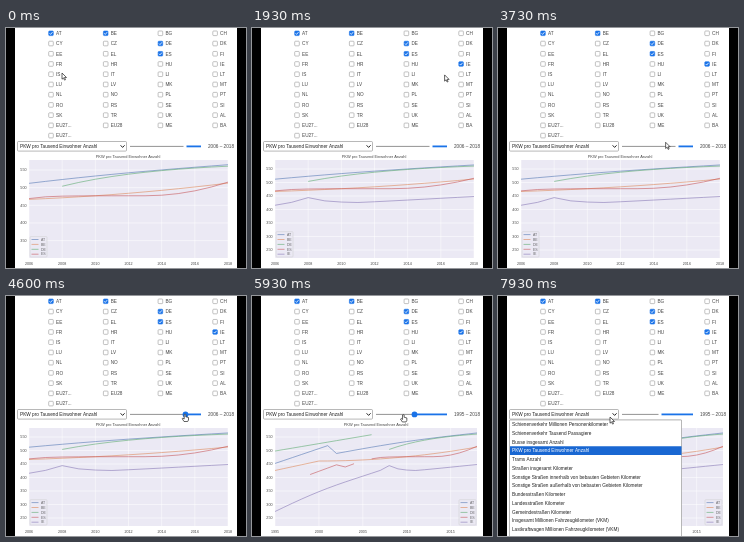
Recreate the animation shown at these times as an HTML page with a canvas. Size 240x240 px, loop 8 s.

```html
<!DOCTYPE html>
<html lang="de">
<head>
<meta charset="utf-8">
<style>
html, body { margin: 0; width: 100%; height: 100%; overflow: hidden; background: #000; }
canvas { display: block; width: 100vw; height: 100vh; }
</style>
</head>
<body>
<canvas></canvas>
<script>
const canvas = document.querySelector('canvas');
const ctx = canvas.getContext('2d');
const LOOP = 8000, BLUE = '#1a73e8', INK = '#444';
const CHECK_IE = 1600, ADD_IE = 1750, DRAG_START = 4750, DRAG_END = 5550, WIDEN = 5650, OPEN = 7110;
const TITLE = 'PKW pro Tausend Einwohner Anzahl';

const COUNTRIES = ['AT BE BG CH', 'CY CZ DE DK', 'EE EL ES FI', 'FR HR HU IE', 'IS IT LI LT', 'LU LV MK MT',
  'NL NO PL PT', 'RO RS SE SI', 'SK TR UK AL', 'EU27... EU28 ME BA', 'EU27...'].map(row => row.split(' '));

const OPTIONS = ['Schienenverkehr Millionen Personenkilometer', 'Schienenverkehr Tausend Passagiere',
  'Busse insgesamt Anzahl', TITLE, 'Trams Anzahl', 'Straßen insgesamt Kilometer',
  'Sonstige Straßen innerhalb von bebauten Gebieten Kilometer',
  'Sonstige Straßen außerhalb von bebauten Gebieten Kilometer', 'Bundesstraßen Kilometer',
  'Landesstraßen Kilometer', 'Gemeindestraßen Kilometer', 'Insgesamt Millionen Fahrzeugkilometer (VKM)',
  'Lastkraftwagen Millionen Fahrzeugkilometer (VKM)'];

const since = (year, start) => Math.max(0, year - start);
const decay = (year, start) => Math.exp(start - year);

// Cars per thousand people by year; NaN leaves a gap in the line.
const SERIES = [
  { name: 'AT', color: '#4c72b0', value: y => y < 2002
    ? 452 + 11 * (y - 1995)
    : 489 + 4.75 * (y - 2002) + 6 * Math.sin(Math.PI * (y - 2002) / 16) },
  { name: 'BE', color: '#dd8452', value: y =>
    426 + 7 * Math.min(y - 1995, 5) + 0.16 * since(y, 2000) ** 2 },
  { name: 'DE', color: '#55a868', value: y => y <= 2006 ? 498 + 5.5 * (y - 1995)
    : y < 2008 ? NaN : 504 + 70 * (1 - Math.exp((2008 - y) / 6)) },
  { name: 'ES', color: '#c44e52', value: y => y < 1999 || y === 2005 ? NaN
    : y < 2005 ? 411 + 12 * (y - 1999) - (y > 2002 ? 20 : 0)
    : 477 - 8 * decay(y, 2006) + 1.55 * since(y, 2013) ** 2 },
  { name: 'IE', color: '#8172b3', value: y => y < 2008
    ? 274 + 13.1 * (y - 1995) + 8 * Math.sin(Math.PI * (y - 1995) / 10)
    : 425 + 19 * decay(y, 2008) + 3.3 * since(y, 2011) }
];

// Pointer stops: arrival time, x, y.
const POINTER = [[0, 56, 45], [1130, 215, 28], [CHECK_IE, 209, 35], [2800, 121, 99], [4100, 179, 118],
  [DRAG_START, 179, 118], [DRAG_END, 162, 118], [6800, 114, 120], [LOOP, 112, 121]];

const clamp = x => Math.min(1, Math.max(0, x));
const ease = x => x * x * (3 - 2 * x);

function pointerAt(t) {
  const i = POINTER.findIndex(p => p[0] > t);
  const [start, x, y] = POINTER[i - 1], [end, nextX, nextY] = POINTER[i];
  const k = ease((t - start) / (end - start));
  return [x + (nextX - x) * k, y + (nextY - y) * k];
}

function rect(x, y, w, h, fill, stroke, radius = 0) {
  ctx.beginPath();
  ctx.roundRect(x, y, w, h, radius);
  if (fill) { ctx.fillStyle = fill; ctx.fill(); }
  if (stroke) { ctx.strokeStyle = stroke; ctx.lineWidth = 0.6; ctx.stroke(); }
}

function line(points, color, width) {
  ctx.beginPath();
  let pen = 'moveTo';
  for (const [x, y] of points) {
    if (isNaN(y)) { pen = 'moveTo'; continue; }
    ctx[pen](x, y);
    pen = 'lineTo';
  }
  ctx.strokeStyle = color;
  ctx.lineWidth = width;
  ctx.stroke();
}

function text(string, x, y, size, color = INK, align = 'left') {
  ctx.font = `${size}px "Liberation Sans", Arial, sans-serif`;
  ctx.textAlign = align;
  ctx.textBaseline = 'middle';
  ctx.fillStyle = color;
  ctx.fillText(string, x, y);
}

function drawCheckboxes(t) {
  const checked = ['AT', 'BE', 'DE', 'ES'].concat(t >= CHECK_IE ? 'IE' : []);
  COUNTRIES.forEach((row, r) => row.forEach((name, c) => {
    const x = 45 + c * 54.7, y = 5.3 + r * 10.23, on = checked.includes(name);
    rect(x - 2.3, y - 2.3, 4.6, 4.6, on ? BLUE : '#fff', on ? BLUE : '#999', 0.8);
    if (on) line([[x - 1.4, y], [x - 0.4, y + 1.1], [x + 1.5, y - 1.2]], '#fff', 0.8);
    text(name, x + 5, y + 0.5, 4.7);
  }));
}

function drawControls(t) {
  rect(11.5, 113.5, 109, 9.6, '#fff', '#888', 1);
  text(TITLE, 14, 118.6, 4.73, '#222');
  line([[114.6, 117.3], [116.6, 119.4], [118.6, 117.3]], '#222', 1);

  const drag = ease(clamp((t - DRAG_START) / (DRAG_END - DRAG_START)));
  const hovered = t > 3900 && t < 6400;
  const start = 180.5 - 17 * drag;
  line([[124, 118.4], [start - (hovered ? 0 : 3), 118.4]], '#777', 0.8);
  line([[start, 118.4], [195, 118.4]], BLUE, 1.8);
  if (hovered) rect(start - 3.9, 115.5, 5.8, 5.8, BLUE, null, 2.9);
  text(`${2006 - Math.round(11 * drag)} – 2018`, 228, 118.7, 4.7, INK, 'right');
}

function drawChart(t) {
  const wide = t >= WIDEN, withIE = t >= ADD_IE;
  const first = wide ? 1995 : 2006, right = wide ? 225 : 222, top = 132, bottom = 230;
  const series = withIE ? SERIES : SERIES.slice(0, 4);
  const years = Array.from({ length: 2019 - first }, (_, i) => first + i);
  const px = year => 23 + (year - first) / (2018 - first) * (right - 23);
  const py = value => (withIE ? 141 : 142) + (550 - value) * (withIE ? 0.27 : 0.353);

  text(TITLE, wide ? 124 : 122, 128.6, 3.94, INK, 'center');
  rect(23, top, right - 23, bottom - top, '#ebe9f4');
  for (let year = first; year <= 2018; year += wide ? 5 : 2) {
    line([[px(year), top], [px(year), bottom]], '#fff', 0.5);
    text(year, px(year), 235.8, 3.7, INK, 'center');
  }
  for (let value = 550; py(value) <= bottom; value -= 50) {
    line([[23, py(value)], [right, py(value)]], '#fff', 0.5);
    text(value, 20.5, py(value) + 0.3, 3.7, INK, 'right');
  }

  const legendX = wide ? 207 : 24, legendH = series.length * 4.9 + 0.8;
  ctx.lineJoin = 'round';
  ctx.globalAlpha = 0.8;
  for (const { color, value } of series) {
    // Only full-length ranges show the years before the German gap.
    const visible = years.filter(y => wide || color !== SERIES[2].color || y >= 2008);
    line(visible.map(y => [px(y), py(value(y))]), color, 0.7);
  }
  rect(legendX, 229 - legendH, 17, legendH, '#ebe9f4', '#ccc', 0.8);
  series.forEach(({ name, color }, i) => {
    const y = 226.2 - (series.length - 1 - i) * 4.9;
    line([[legendX + 1.5, y], [legendX + 8.5, y]], color, 0.7);
    text(name, legendX + 11, y + 0.3, 3.5);
  });
  ctx.globalAlpha = 1;
}

function drawMenu(t) {
  if (t < OPEN) return;
  rect(11.5, 124, 172, 118, null, '#aaa', 1);
  ctx.globalAlpha = clamp((t - OPEN - 30) / 150);
  rect(11.5, 124, 172, 118, '#fff', '#999');
  OPTIONS.forEach((option, i) => {
    const y = 128.4 + i * 8.77, selected = option === TITLE;
    if (selected) rect(12, y - 4.4, 171.5, 8.8, '#1967d2');
    text(option, 14, y + 0.3, 4.73, selected ? '#fff' : '#222');
  });
  ctx.globalAlpha = 1;
}

function drawPointer(t) {
  const hand = t > 3950 && t < 6250;
  const shape = new Path2D(hand
    ? 'M-.8 .5Q0-.4 .8 .5V2.8L3.5 3.5V6L2.7 7.5H-1L-2.8 4.6L-2 4L-.8 5Z'
    : 'M0 0V6.2L1.5 4.9L2.5 7.1L3.5 6.7L2.5 4.5H4.5Z');
  ctx.save();
  ctx.translate(...pointerAt(t));
  ctx.fillStyle = '#fff';
  ctx.strokeStyle = '#222';
  ctx.lineWidth = 0.7;
  ctx.fill(shape);
  ctx.stroke(shape);
  ctx.restore();
}

function frame(now) {
  const t = now % LOOP;
  const size = Math.round(innerWidth * devicePixelRatio) || 240;
  if (canvas.width !== size) canvas.width = canvas.height = size;
  ctx.setTransform(size / 240, 0, 0, size / 240, 0, 0);
  rect(0, 0, 240, 240, '#000');
  ctx.save();
  ctx.beginPath();
  ctx.rect(9, 0, 222, 240);
  ctx.clip();
  rect(9, 0, 222, 240, '#fff');
  drawCheckboxes(t);
  drawControls(t);
  drawChart(t);
  drawMenu(t);
  drawPointer(t);
  ctx.restore();
  requestAnimationFrame(frame);
}
requestAnimationFrame(frame);
</script>
</body>
</html>
```
